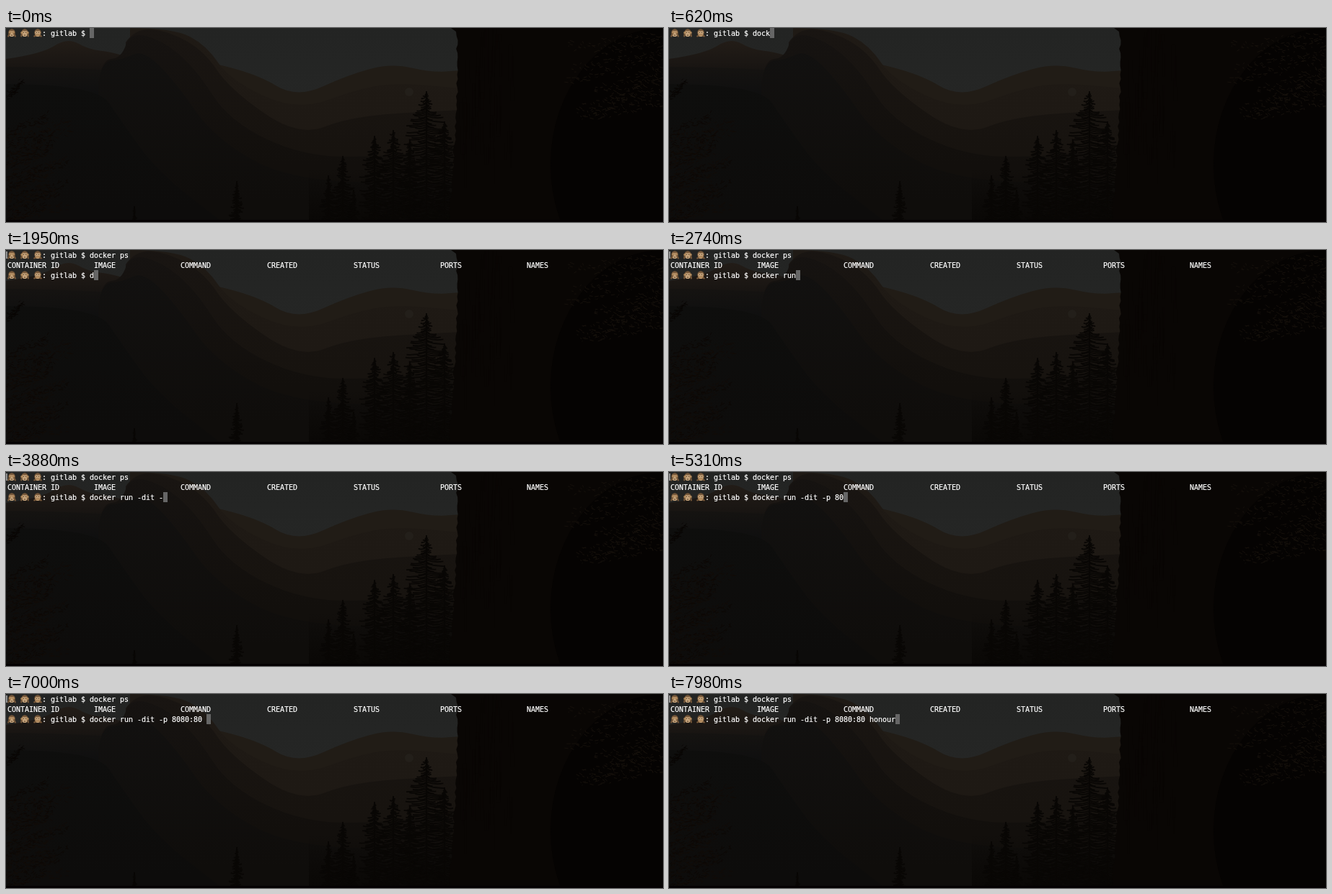
Write an HTML page with a canvas that moves like this. It is 911x270 px and loops after 8 s.

```html
<!DOCTYPE html>
<html lang="en">
<head>
<meta charset="utf-8">
<title>Terminal session</title>
<style>
  html, body { margin: 0; width: 100%; height: 100%; overflow: hidden; background: #000; }
  canvas { display: block; }
</style>
</head>
<body>
<canvas id="stage" width="911" height="270"></canvas>
<script>
const W = 911, H = 270, LOOP = 8000;
const CELL = 6, ROW = 14, LEFT = 2;
const ENTER = 1140, STROKE = 87;
const ctx = document.getElementById('stage').getContext('2d');

// Start of each burst of typing; '|' separates strokes at an even pace.
const FIRST = { 260: 'd', 440: 'o|c|k|e|r| p|s' };
const SECOND = {
  1950: 'd', 2130: 'o|c|k|e|r ', 2650: 'r|un', 2910: ' |-', 3180: 'd', 3350: 'i|t',
  3620: ' ', 3880: '-', 4690: 'p', 4960: ' ', 5220: '8|0', 5490: '8|0',
  6200: ':', 6550: '80', 7000: ' ', 7450: 'h|o|n|o|u', 7980: 'r'
};
const HEADERS = ['CONTAINER ID', 'IMAGE', 'COMMAND', 'CREATED', 'STATUS', 'PORTS', 'NAMES'];

function random(seed) {
  return () => (seed = (seed * 16807) % 2147483647) / 2147483647;
}

function layer(draw) {
  const c = document.createElement('canvas');
  c.width = W;
  c.height = H;
  draw(c.getContext('2d'));
  return c;
}

function fade(g, y0, y1, ...colors) {
  const grad = g.createLinearGradient(0, y0, 0, y1);
  colors.forEach((c, i) => grad.addColorStop(i / (colors.length - 1), c));
  return grad;
}

// A smooth skyline through a few points, filled down to the bottom edge.
function ridge(g, fill, points) {
  const first = points[0], last = points[points.length - 1];
  g.fillStyle = fill;
  g.beginPath();
  g.moveTo(first[0], H);
  g.lineTo(...first);
  for (let i = 1; i < points.length - 1; i++) {
    const [x, y] = points[i], [nx, ny] = points[i + 1];
    g.quadraticCurveTo(x, y, (x + nx) / 2, (y + ny) / 2);
  }
  g.lineTo(...last);
  g.lineTo(last[0], H);
  g.fill();
}

function disc(g, color, x, y, rx, ry = rx) {
  g.fillStyle = color;
  g.beginPath();
  g.ellipse(x, y, rx, ry, 0, 0, Math.PI * 2);
  g.fill();
}

function pine(g, x, top) {
  const rnd = random(x * 31), spread = 6 + (H - top) * 0.14;
  g.strokeStyle = '#080604';
  g.lineWidth = 1.8;
  g.beginPath();
  g.moveTo(x, top);
  g.lineTo(x, H);
  for (let y = top + 3; y < H; y += 2.5) {
    const reach = spread * Math.min(1, 0.1 + (y - top) / 55);
    for (const side of [-1, 1]) {
      const len = side * reach * (0.25 + 0.75 * rnd());
      g.moveTo(x, y - 1);
      g.quadraticCurveTo(x + len * 0.5, y + 3, x + len, y + 3 * rnd());
    }
  }
  g.stroke();
}

// Needles scattered along a slanting branch.
function bough(g, rnd, color, x, y, dx, dy) {
  g.strokeStyle = color;
  g.lineWidth = 1;
  g.beginPath();
  for (let k = 0; k < 1; k += 0.02) {
    const px = x + dx * k + 6 * rnd(), py = y + dy * k + 12 * (rnd() - 0.5);
    g.moveTo(px, py);
    g.lineTo(px + Math.sign(dx) * 6 * rnd(), py + 6 * (rnd() - 0.6));
  }
  g.stroke();
}

function landscape(g) {
  g.fillStyle = fade(g, 0, 100, '#232423', '#252625');
  g.fillRect(0, 0, W, H);

  // hills on the left
  ridge(g, fade(g, 20, 80, '#221c17', '#1a1613', '#100f0e'),
    [[0, 43], [50, 36], [85, 13], [115, 30], [145, 33], [180, 44]]);
  ridge(g, fade(g, 55, 130, '#151311', '#0f0f0f', '#0d0d0c'),
    [[0, 54], [90, 55], [180, 62]]);

  // nested slopes of the valley
  ridge(g, '#211c16',
    [[290, 50], [345, 62], [403, 98], [475, 65], [535, 49], [590, 62], [630, 59]]);
  ridge(g, fade(g, 0, 140, '#1f1a15', '#1e1914'),
    [[172, 0], [232, 0], [278, 24], [310, 72], [403, 116], [490, 84], [545, 76], [630, 84]]);
  ridge(g, fade(g, 0, 170, '#191512', '#17130f'),
    [[166, 20], [180, 0], [225, 4], [275, 32], [310, 85], [406, 152], [480, 122], [630, 114]]);
  ridge(g, fade(g, 0, 190, '#161311', '#120f0c'),
    [[128, 78], [132, 44], [160, 42], [172, 6], [215, 16], [262, 55], [310, 130], [410, 178], [520, 180], [630, 165]]);
  ridge(g, fade(g, 20, 240, '#121110', '#0f0d0b'),
    [[128, 78], [132, 46], [162, 44], [190, 30], [235, 75], [290, 155], [400, 215], [630, 215]]);
  ridge(g, fade(g, 78, 250, '#0e0e0d', '#0d0c0b'),
    [[0, 78], [125, 78], [160, 130], [210, 200], [300, H]]);

  disc(g, '#231f1a', 559, 89, 6);

  // forest
  ridge(g, fade(g, 195, H, '#0b090700', '#090705'), [[420, 195], [640, 195]]);
  for (const [x, top] of [[583, 88], [537, 142], [511, 150], [560, 155], [608, 130],
    [467, 178], [447, 205], [482, 225], [320, 213], [178, 248]]) pine(g, x, top);

  // cliff, with a rounded shadow over its right side
  const rnd = random(17);
  g.fillStyle = '#090604';
  g.beginPath();
  g.moveTo(W, 0);
  g.lineTo(617, 0);
  for (let y = 5; y <= H; y += 6) g.lineTo(624 + 3 * rnd() - Math.max(0, y - 110) * 0.07, y);
  g.lineTo(W, H);
  g.fill();
  g.fillStyle = '#0d080533';
  for (let i = 0; i < 60; i++) g.fillRect(628 + 75 * rnd(), 170 * rnd(), 2 + 5 * rnd(), 20 + 40 * rnd());
  g.save();
  g.beginPath();
  g.rect(690, 0, W, H);
  g.clip();
  disc(g, '#050302', 910, 190, 155, 190);
  g.restore();

  // near branches on both sides
  for (let i = 0; i < 9; i++) {
    bough(g, rnd, '#15100b', W, 8 + i * 12, -70 - 70 * rnd(), 10 + 25 * rnd());
    bough(g, rnd, '#0c0704', -4, 148 + i * 15, 45 + 55 * rnd(), -28 + 10 * rnd());
    bough(g, rnd, '#110b07', -4, 155 + i * 14, 40 + 55 * rnd(), -28 + 10 * rnd());
  }
  bough(g, rnd, '#080503', -4, 95, 22, -18);

  g.fillStyle = '#040102';
  g.fillRect(0, 267, W, 3);
}

// Paws cover the eyes, the ears or the mouth.
function monkey(g, x, y, covers) {
  const fur = '#76583a', skin = '#c8a67d', paw = '#ad875b', ink = '#3a2818';
  disc(g, fur, x, y - 0.6, 4.8, 5.2);
  disc(g, skin, x - 1.6, y - 0.8, 2.1, 2.3);
  disc(g, skin, x + 1.6, y - 0.8, 2.1, 2.3);
  disc(g, skin, x, y + 2.3, 3.5, 2.8);
  if (covers !== 'eyes') {
    disc(g, ink, x - 1.5, y - 0.9, 0.7);
    disc(g, ink, x + 1.5, y - 0.9, 0.7);
  }
  if (covers !== 'mouth') disc(g, ink, x, y + 3, 1.4, 0.5);
  const [dx, dy] = { eyes: [2, -1], ears: [4, -0.5], mouth: [1.2, 2.8] }[covers];
  g.lineCap = 'round';
  g.lineWidth = 2.2;
  g.strokeStyle = fur;
  for (const side of [-1, 1]) {
    g.beginPath();
    g.moveTo(x + side * 4.8, y + 4.4);
    g.lineTo(x + side * dx, y + dy);
    g.stroke();
    disc(g, paw, x + side * dx, y + dy, 1.7);
  }
}

// Every character sits on the fixed terminal grid.
function print(text, col, row) {
  ctx.fillStyle = ctx.strokeStyle = '#fff';
  ctx.lineWidth = 0.2;
  [...text].forEach((ch, i) => {
    const at = [ch, LEFT + (col + i) * CELL, row * ROW + 11];
    ctx.fillText(...at);
    ctx.strokeText(...at);
  });
}

function prompt(row, typed, active) {
  ['eyes', 'ears', 'mouth'].forEach((part, i) => monkey(ctx, 8 + i * 18, row * ROW + 7, part));
  print(': gitlab $ ' + typed, 8, row);
  if (active) {
    ctx.fillStyle = '#666';
    ctx.fillRect(LEFT + (19 + typed.length) * CELL, row * ROW, CELL, ROW);
  }
}

function mark(row) {
  ctx.strokeStyle = '#8c8c8c';
  ctx.lineWidth = 1;
  ctx.strokeRect(0.5, row * ROW + 2.5, 1, 9);
}

function typedAt(bursts, t) {
  return Object.entries(bursts).flatMap(([start, keys]) =>
    keys.split('|').filter((_, i) => t >= +start + i * STROKE)).join('');
}

const backdrop = layer(landscape);

function render(t) {
  ctx.drawImage(backdrop, 0, 0);
  ctx.font = '10px "DejaVu Sans Mono", monospace';
  const entered = t >= ENTER;
  if (entered) mark(0);
  prompt(0, typedAt(FIRST, t), !entered);
  if (entered) {
    HEADERS.forEach((name, i) => print(name, i * 20, 1));
    prompt(2, typedAt(SECOND, t), true);
  }
}

const start = performance.now();
function frame() {
  render((performance.now() - start) % LOOP);
  requestAnimationFrame(frame);
}
frame();
</script>
</body>
</html>
```
